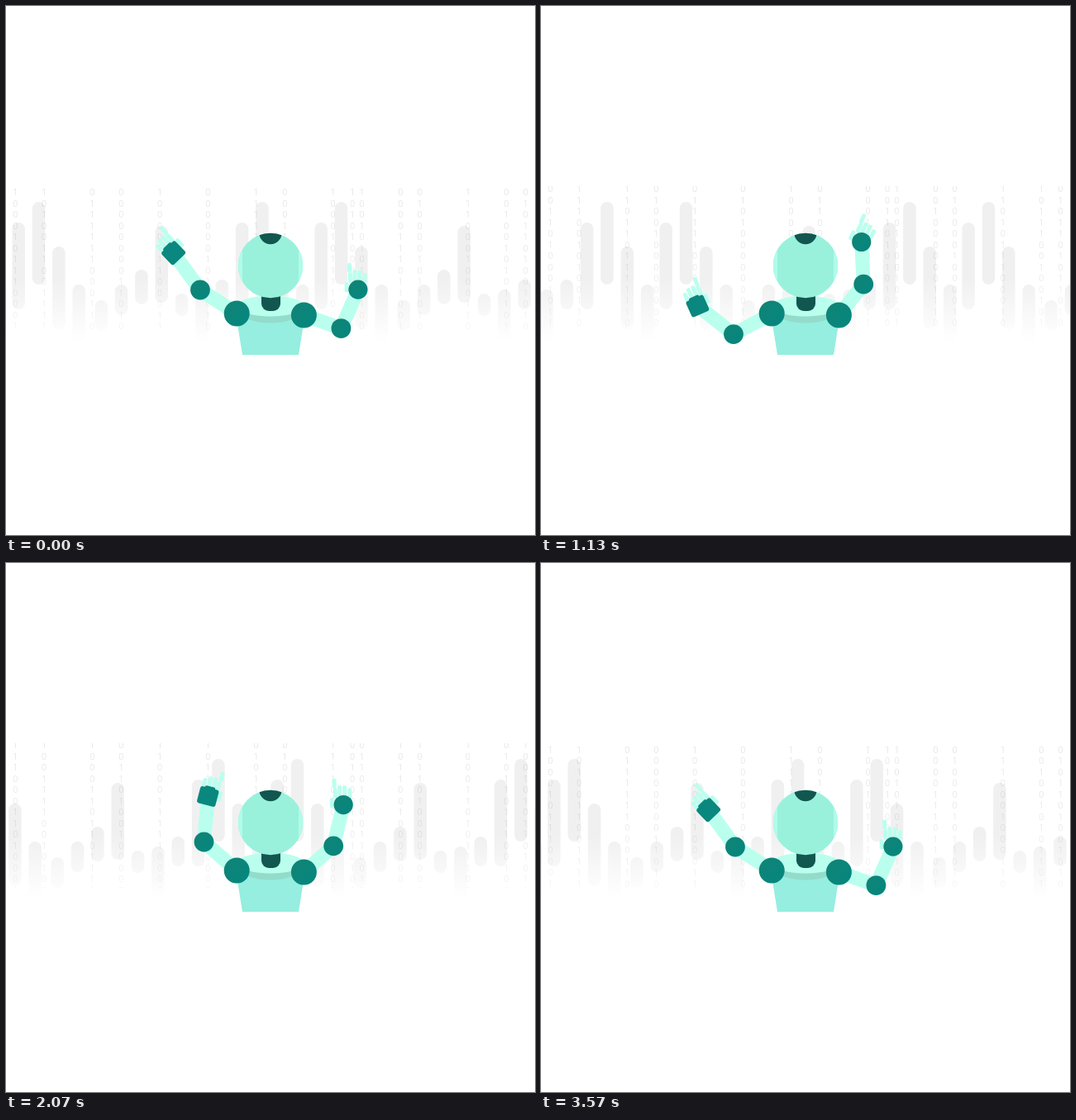
These frames come from a looping animation (640x640 px, 3610 ms). An HTML page with a canvas:

```html
<!DOCTYPE html>
<html>
<head>
<meta charset="utf-8">
<style>
  html, body { margin: 0; width: 100%; height: 100%; overflow: hidden; background: #fff; }
  canvas { display: block; }
</style>
</head>
<body>
<canvas id="stage" width="640" height="640"></canvas>
<script>
const ctx = document.getElementById('stage').getContext('2d');
const LOOP = 3610;
const SKIN = '#baffee', TEAL = '#0a877e', DARK = '#11574f';

// The picture advances in ticks of roughly 40 ms: [time, tick]
const CLOCK = [[0, 0], [30, 1], [530, 13], [570, 14], [1070, 27], [1130, 28], [1630, 41], [1670, 42],
  [2170, 54], [2200, 55], [2670, 67], [2730, 68], [3230, 81], [3270, 82], [3570, 89], [3611, 90]];

// Arm angles in degrees clockwise from straight up, at the ticks in POSE_TICKS
const POSE_TICKS = [0, 13, 28, 43, 62, 76, 89];
const LEFT = {
  shoulder: [279.2, 372], lengths: [52.6, 56.2], side: 1,
  upper: [-57.2, -33.2, -118.5, -67.4, -34.9, -68.7],
  fore: [-36, -2, -51.5, -7.1, 16.6, 25.4],
  hand: [-44, 2, -24, 16, 5, 1]
};
const RIGHT = {
  shoulder: [360.4, 374], lengths: [47.8, 51.2], side: -1,
  upper: [109.6, 91.2, 38.6, 20.3, 93.6, 93],
  fore: [23.6, -3.4, -2.8, -11.2, 45.4, -5.5],
  hand: [0, 4, 24, -20, 29, -3]
};

// Bars as [top, bottom]; the first four shapes return at the end of the run
const HEAD_BARS = [[262, 367], [237, 337], [291, 391], [337, 437]];
const BARS = [...HEAD_BARS, [356, 393], [337, 374], [319, 361], [266, 359],
  [348, 375], [343, 437], [331, 367], ...HEAD_BARS];
const BAR_PERIOD = 366;

const DIGIT_COLUMNS = [0, 3, 8, 11, 15, 20, 25, 28, 33, 35, 36, 40, 42, 47, 51, 53];
const ROW = 13.5, ROWS = 15;

const mod = (a, n) => ((a % n) + n) % n;

function tickAt(time) {
  const i = CLOCK.findIndex(c => c[0] > time);
  const [t0, k0] = CLOCK[i - 1], [t1, k1] = CLOCK[i];
  return Math.floor(k0 + (k1 - k0) * (time - t0) / (t1 - t0) + 1e-6);
}

// Smooth closed curve through the pose angles, in radians
function angleAt(values, tick) {
  const n = values.length;
  let i = 0;
  while (i < n - 1 && tick >= POSE_TICKS[i + 1]) i++;
  const u = Math.min(1, (tick - POSE_TICKS[i]) / (POSE_TICKS[i + 1] - POSE_TICKS[i]));
  const [a, b, c, d] = [-1, 0, 1, 2].map(k => values[mod(i + k, n)]);
  const angle = b + u / 2 * (c - a + u * (2 * a - 5 * b + 4 * c - d + u * (3 * (b - c) + d - a)));
  return angle * Math.PI / 180;
}

function fill(color, trace) {
  ctx.fillStyle = color;
  ctx.beginPath();
  trace();
  ctx.fill();
}
const disc = (x, y, rx, color, ry = rx) => fill(color, () => ctx.ellipse(x, y, rx, ry, 0, 0, 7));
const box = (x, y, w, h, r, color) => fill(color, () => ctx.roundRect(x, y, w, h, r));

function joint(x, y, r) {
  const shade = ctx.createLinearGradient(x - r, y - r, x + r, y + r);
  shade.addColorStop(0, '#128375');
  shade.addColorStop(1, '#04877f');
  disc(x, y, r, shade);
}

function drawBars(tick) {
  const fade = ctx.createLinearGradient(0, 330, 0, 406);
  fade.addColorStop(0, '#f0f0f0');
  fade.addColorStop(1, '#fff');
  const start = 15.2 - mod(8.217 * tick, BAR_PERIOD);
  for (let x = start - BAR_PERIOD; x < 660; x += BAR_PERIOD) {
    BARS.forEach(([top, bottom], i) => {
      const left = x + 24.35 * i + (i > 3 ? 2.6 : 0) - 7.75;
      box(left, top, 15.5, bottom - top, 7.75, fade);
    });
  }
}

function drawDigits(tick) {
  const scroll = 2.285 * tick, shift = Math.floor(scroll / ROW);
  ctx.save();
  ctx.beginPath();
  ctx.rect(0, 218, 640, 175);
  ctx.clip();
  ctx.font = '300 11px Roboto, sans-serif';
  ctx.textAlign = 'center';
  ctx.textBaseline = 'alphabetic';
  const fade = ctx.createLinearGradient(0, 218, 0, 393);
  fade.addColorStop(0, 'rgba(0,0,0,.13)');
  fade.addColorStop(0.6, 'rgba(0,0,0,.1)');
  fade.addColorStop(1, 'rgba(0,0,0,.05)');
  ctx.fillStyle = fade;
  DIGIT_COLUMNS.forEach((column, c) => {
    for (let row = -1; row < 13; row++) {
      const seed = Math.sin((c + 1) * 12.99 + mod(row - shift, ROWS) * 78.23) * 43758.5;
      ctx.fillText(mod(seed, 1) < 0.5 ? '0' : '1', 11.2 + 11.65 * column, 229 + row * ROW + mod(scroll, ROW));
    }
  });
  ctx.restore();
}

function drawBody() {
  fill('#95eedf', () => {
    ctx.moveTo(278, 372);
    ctx.lineTo(362, 372);
    ctx.lineTo(354, 422);
    ctx.lineTo(286, 422);
  });
  disc(320, 369, 37, '#93dccb', 14.5);
  disc(320, 363, 41, SKIN, 12.5);
  box(309, 342, 23, 27, [0, 0, 9, 9], DARK);

  ctx.save();
  ctx.beginPath();
  ctx.arc(320, 314, 39.2, 0, 7);
  ctx.clip();
  box(280, 274, 80, 80, 0, '#99f1dc');
  box(280, 290, 6, 48, 0, '#b0fbe9');
  box(354, 290, 6, 48, 0, '#b0fbe9');
  disc(320, 275, 13.5, DARK, 13.2);
  ctx.restore();
}

function drawHand(x, y, angle, side) {
  ctx.save();
  ctx.translate(x, y);
  ctx.rotate(angle);
  ctx.scale(side, 1);
  const finger = (cx, top, bottom) => box(cx - 2.5, top, 5, bottom - top, 2.4, SKIN);
  finger(10.3, -32.5, -20.5);
  finger(9.5, -21, -8);
  finger(4, -24, -9);
  finger(-2, -23.5, -9);
  finger(-8.2, -20, -8);
  finger(13.8, -9, 3.5);
  if (side > 0) {
    box(-11.5, -9.5, 23, 21, 3, TEAL);
    box(-6.5, -11.5, 13, 6, 2, TEAL);
  }
  ctx.restore();
  if (side < 0) joint(x, y, 11.6);
}

function drawArm(arm, tick) {
  const [sx, sy] = arm.shoulder;
  const reach = (x, y, angle, length) => [x + Math.sin(angle) * length, y - Math.cos(angle) * length];
  const [ex, ey] = reach(sx, sy, angleAt(arm.upper, tick), arm.lengths[0]);
  const [wx, wy] = reach(ex, ey, angleAt(arm.fore, tick), arm.lengths[1]);
  ctx.strokeStyle = SKIN;
  ctx.lineWidth = 17;
  ctx.beginPath();
  ctx.moveTo(sx, sy);
  ctx.lineTo(ex, ey);
  ctx.lineTo(wx, wy);
  ctx.lineJoin = 'round';
  ctx.stroke();
  drawHand(wx, wy, angleAt(arm.hand, tick), arm.side);
  joint(ex, ey, 11.9);
  joint(sx, sy, 15.5);
}

function render() {
  const tick = tickAt(performance.now() % LOOP);
  ctx.fillStyle = '#fff';
  ctx.fillRect(0, 0, 640, 640);
  drawBars(tick);
  drawDigits(tick);
  drawBody();
  drawArm(LEFT, tick);
  drawArm(RIGHT, tick);
  requestAnimationFrame(render);
}
render();
</script>
</body>
</html>
```
